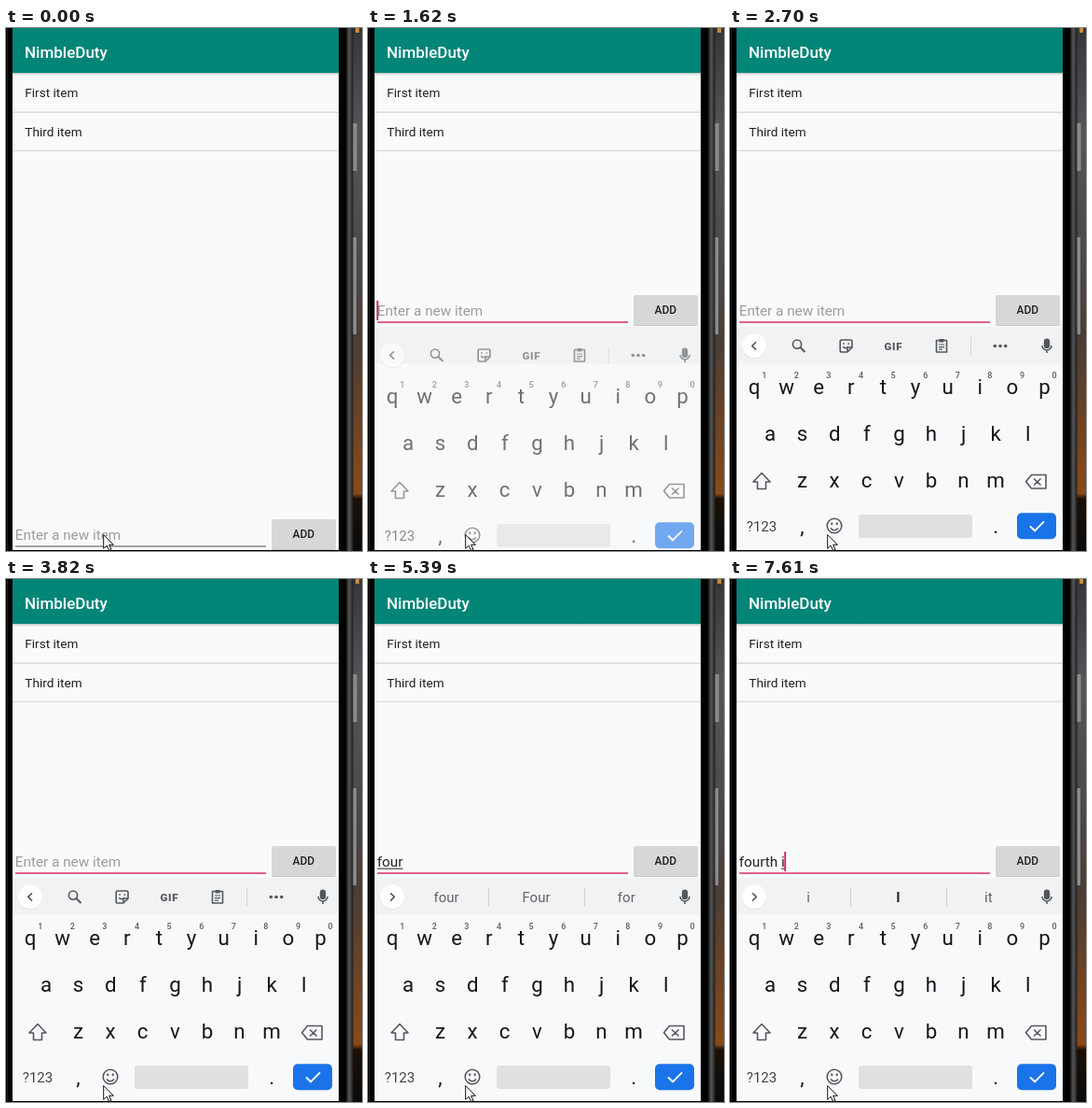
These frames come from a looping animation (382x560 px, 8000 ms). An HTML page:

```html
<!DOCTYPE html>
<html lang="en">
<head>
<meta charset="utf-8">
<title>Todo list demo</title>
<style>
html, body { margin: 0; width: 100%; height: 100%; overflow: hidden; background: #000; }
svg { display: block; }
text { font-family: Roboto, sans-serif; white-space: pre; }
.item { font-size: 13.6px; fill: #1f2020; }
.field { font-size: 15.3px; }
.key { font-size: 22.3px; fill: #15171a; text-anchor: middle; }
.hint { font-size: 9px; font-weight: 500; fill: #5a5e63; text-anchor: middle; }
.word { font-size: 15px; fill: #5f6368; text-anchor: middle; }
.word.best { font-weight: 700; fill: #25282b; }
.icon { fill: none; stroke: #54585d; stroke-width: 1.6; stroke-linejoin: round; }
.solid { fill: #54585d; }
</style>
</head>
<body>
<svg id="stage" width="382" height="560" viewBox="0 0 382 560">
  <defs>
    <linearGradient id="wall" x2="0" y2="1">
      <stop offset="0" stop-color="#35363b"/>
      <stop offset=".2" stop-color="#55555a"/>
      <stop offset=".42" stop-color="#4b4a4c"/>
      <stop offset=".6" stop-color="#4a3e36"/>
      <stop offset=".75" stop-color="#6b4325"/>
      <stop offset=".89" stop-color="#8a4a17"/>
      <stop offset=".9" stop-color="#1a1008"/>
      <stop offset="1" stop-color="#0b0a0a"/>
    </linearGradient>
    <linearGradient id="edge">
      <stop offset="0" stop-color="#161616"/>
      <stop offset=".45" stop-color="#555"/>
      <stop offset="1" stop-color="#1c1c1c"/>
    </linearGradient>
    <linearGradient id="shade" x2="0" y2="1">
      <stop offset="0" stop-color="#000" stop-opacity=".22"/>
      <stop offset="1" stop-color="#000" stop-opacity="0"/>
    </linearGradient>
    <clipPath id="screen"><path d="M7 0H357V559H7Z"/></clipPath>
  </defs>

  <rect width="382" height="560"/>
  <rect x="372" width="10" height="560" fill="url(#wall)"/>
  <path d="M375 0h4v5h-4z" fill="#c98a3a"/>
  <rect x="365" width="7.5" height="560" fill="url(#edge)"/>
  <path d="M372.5 102h4v51h-4zM372.5 224h3.5v104h-3.5z" fill="#8b8b8d"/>
  <path d="M1.5 0V560" stroke="#1d1d1d"/>

  <g clip-path="url(#screen)">
    <rect x="7" width="350" height="560" fill="#f9fbfa"/>
    <rect x="7" width="350" height="48" fill="#008577"/>
    <rect x="7" y="48" width="350" height="3" fill="url(#shade)"/>
    <text x="20" y="31.7" font-size="17" font-weight="500" fill="#fff">NimbleDuty</text>
    <text class="item" x="20.3" y="74.3">First item</text>
    <text class="item" x="20.3" y="116.2">Third item</text>
    <path d="M7 90.2H357M7 131.4H357" stroke="#d9dbda" stroke-width="1.4"/>

    <g id="entry">
      <rect x="285" y="286.7" width="69" height="32.3" rx="2" fill="#c6c8c7"/>
      <rect x="285" y="286" width="69" height="32" rx="2" fill="#d6d8d7"/>
      <text x="319.3" y="306.1" font-size="11.9" font-weight="500" fill="#222" text-anchor="middle">ADD</text>
      <text id="prompt" class="field" x="9.8" y="308.3" fill="#9b9d9c">Enter a new item</text>
      <text id="typed" class="field" x="9.8" y="308.3" fill="#222"></text>
      <rect id="under" y="309.6" height="1" fill="#222"/>
      <rect id="line" x="10" y="314.2" width="269" height="1.6"/>
      <rect id="caret" y="292" width="1.8" height="21" fill="#d81b60"/>
    </g>

    <g id="board">
      <rect x="7" y="320" width="350" height="40" fill="#f0f2f3"/>
      <rect x="7" y="359.5" width="350" height="215" fill="#f8f9fb"/>
      <g id="face">
        <circle cx="26" cy="340.8" r="13.2" fill="#dfe1e3"/>
        <circle cx="26" cy="340.2" r="13" fill="#fff"/>
        <path id="chevron" class="icon"/>
        <g class="icon">
          <rect x="337.6" y="333.4" width="4.8" height="9" rx="2.4" class="solid"/>
          <path d="M335 340a5 5 0 0 0 10 0M340 345v3"/>
        </g>
        <g id="tools">
          <g class="icon">
            <circle cx="72" cy="338.6" r="4.6"/>
            <path d="M75.4 342L80.5 347" stroke-width="2"/>
            <path d="M120 334H129.5Q131 334 131 335.5V342L126 347H120Q118.200 347 118.200 345.500V335.500Q118.200 334 120 334ZM131 342H126V347"/>
            <path d="M121.300 341.200Q123.500 344 126.500 341.500M122 337.300v1.500M127.300 337.300v1.500"/>
            <path d="M221.500 334.500H232.500V347H221.500Z"/>
            <path d="M224.500 334.700H229.500" stroke-width="3.500"/>
            <path d="M224 339H230M224 341.600H230M224 344.200H228" stroke-width="1.200"/>
          </g>
          <text x="175.300" y="344.500" font-size="11.500" font-weight="900" letter-spacing=".7" fill="#54585d" text-anchor="middle">GIF</text>
          <path d="M258.500 331V350" stroke="#d3d6d8"/>
          <g class="solid"><circle cx="284.300" cy="340.500" r="1.800"/><circle cx="290" cy="340.500" r="1.800"/><circle cx="295.700" cy="340.500" r="1.800"/></g>
        </g>
        <g id="words">
          <path d="M129.500 331V350.500M232.500 331V350.500" stroke="#cfd2d4"/>
          <text class="word" x="84" y="346.200"></text>
          <text class="word" x="180.500" y="346.200"></text>
          <text class="word" x="277.300" y="346.200"></text>
        </g>
        <g id="keys"></g>
        <g class="icon">
          <path d="M34 476.500L43 486H38.500V493.500H29.500V486H25Z"/>
          <path d="M323.500 478.500H339V493H323.500L317.500 485.700ZM326 482.500L333.500 489.500M333.500 482.500L326 489.500"/>
          <circle cx="112" cy="533" r="7.800"/>
          <path d="M108 535.500Q112 540 116 535.500"/>
          <path d="M109.300 529.500v2.400M114.700 529.500v2.400" stroke-width="2"/>
        </g>
        <text x="34" y="538.700" font-size="15" fill="#3f4347" text-anchor="middle">?123</text>
        <text class="key" x="77.500" y="541">,</text>
        <text class="key" x="285.300" y="541">.</text>
        <rect x="138" y="521" width="122" height="25" rx="3" fill="#dfe1e1"/>
        <rect x="308" y="519.300" width="42" height="28" rx="5" fill="#1a73e8"/>
        <path d="M322 533.500L327 538.300L337 528.300" fill="none" stroke="#fff" stroke-width="1.900"/>
      </g>
    </g>
  </g>
  <path d="M104.700 542.500V557.300L108.200 554.200L110.700 559.600L113 558.500L110.600 553.300H115.400Z" fill="#fff" stroke="#111"/>
</svg>
<script>
const $ = id => document.getElementById(id);
const LOOP = 8000;

const rows = [["qwertyuiop", 26, 392], ["asdfghjkl", 43, 442], ["zxcvbnm", 77.5, 492]];
const label = (cls, x, y, s) => `<text class="${cls}" x="${x}" y="${y}">${s}</text>`;
$("keys").innerHTML = rows.map(([chars, x0, y], r) => [...chars].map((c, i) => {
  const x = x0 + i * 34.6;
  return label("key", x, y, c) + (r ? "" : label("hint", x + 10.7, 374.8, (i + 1) % 10));
}).join("")).join("");

// [time, typed text, suggestions; "*" marks the bold one]
const typing = [
  [0, "", ""],
  [4070, "f", "f,*for,if"],
  [4220, "fo", "fo,*for,do"],
  [4870, "fou", "fou,*for,four"],
  [4990, "four", "four,Four,for"],
  [6100, "fourt", "fourt,*fourth,forty"],
  [6250, "fourth", "fourth,Fourth,fourths"],
  [6770, "fourth ", "and,of,time"],
  [7610, "fourth i", "i,*I,it"]
];
// the caret toggles at each of these times, starting hidden
const blinks = [1240, 1770, 2300, 2700, 3260, 3820, 4070, 4750, 4870, 5390, 5980, 6650, 6770, 7330, 7610];
const FOCUS = 1240, OPEN = 1620, SETTLED = 1770;

const show = (el, on) => el.setAttribute("visibility", on ? "inherit" : "hidden");
const setX = (el, x, w) => { el.setAttribute("x", x); el.setAttribute("width", w); };
const words = [...$("words").querySelectorAll("text")];
const typed = $("typed");
const width = n => n ? typed.getSubStringLength(0, n) : 0;

function render(t) {
  const [, text, picks] = typing.filter(s => s[0] <= t).pop();
  const open = t >= OPEN, focus = t >= FOCUS;

  $("entry").setAttribute("transform", `translate(0 ${open ? 0 : 240})`);
  $("line").setAttribute("fill", focus ? "#d81b60" : "#8c8e8d");
  $("line").setAttribute("opacity", open ? 0.85 : 1);
  show($("board"), open);
  const rising = t < SETTLED;
  $("face").setAttribute("transform", `translate(0 ${rising ? 10 : 0})`);
  $("face").setAttribute("opacity", rising ? 0.6 : 1);

  show($("prompt"), !text);
  typed.textContent = text;
  const start = text.lastIndexOf(" ") + 1;
  const left = width(start), end = width(text.length);
  setX($("under"), 9.8 + left, end - left);
  setX($("caret"), 9.3 + end, 1.8);
  show($("caret"), blinks.filter(b => b <= t).length % 2);

  show($("tools"), !picks);
  show($("words"), picks);
  $("chevron").setAttribute("d", picks ? "M24 336.2L28.3 340.4L24 344.6" : "M28 336.2L23.7 340.4L28 344.6");
  const list = picks.split(",");
  words.forEach((el, i) => {
    const s = list[i] || "";
    el.textContent = s.replace("*", "");
    el.classList.toggle("best", s[0] === "*");
  });
}

const begin = performance.now();
function tick() {
  render((performance.now() - begin) % LOOP);
  requestAnimationFrame(tick);
}
tick();
</script>
</body>
</html>
```
